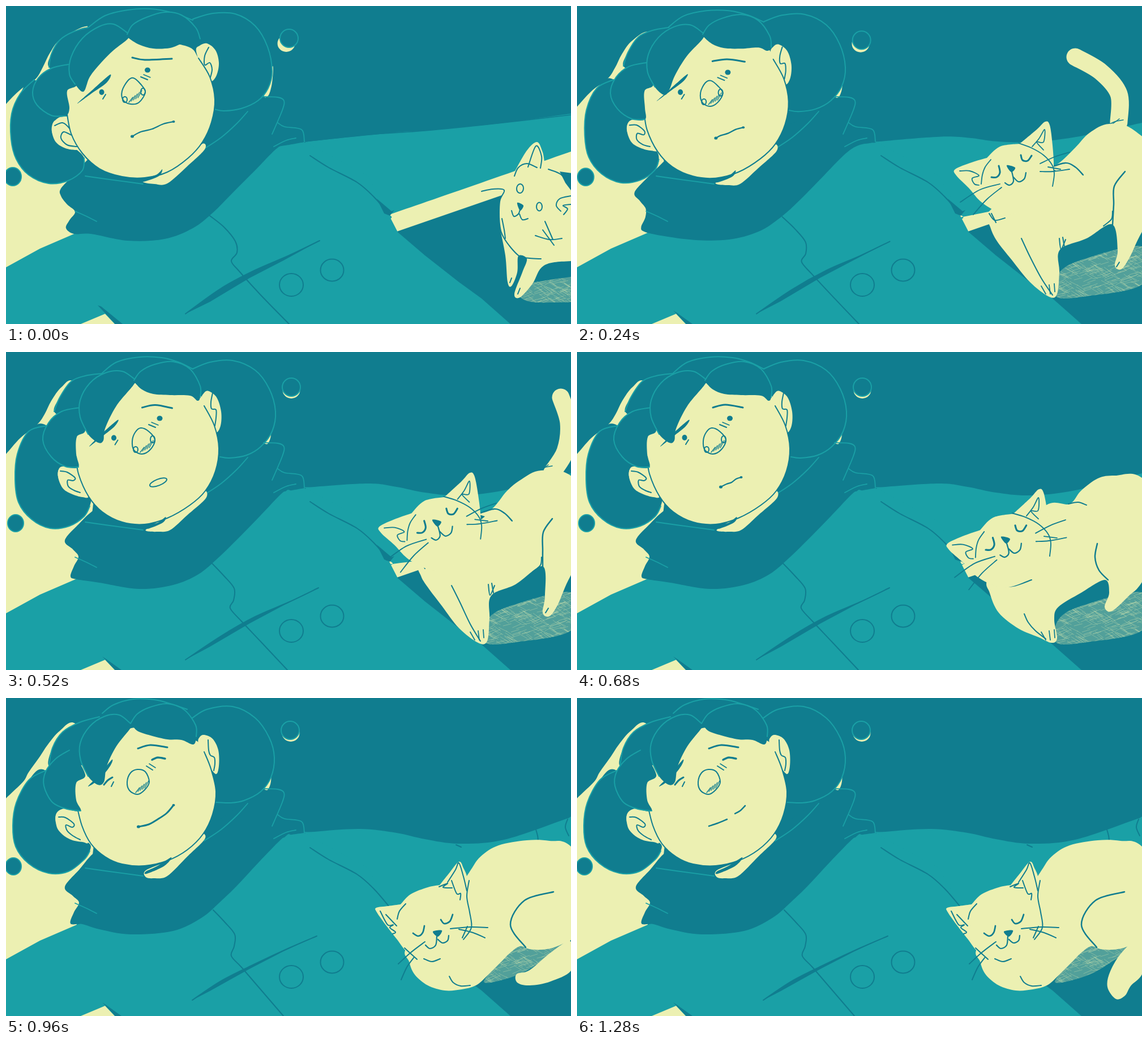
These frames come from a looping animation (998 by 561 pixels, 1.4 s). An HTML page with a canvas:

```html
<!DOCTYPE html>
<html lang="en">
<head>
<meta charset="utf-8">
<title>Cat nap</title>
<style>
html, body { margin: 0; width: 100%; height: 100%; overflow: hidden; background: #107d8f; }
canvas { display: block; width: 100vw; height: 100vh; }
</style>
</head>
<body>
<canvas id="stage" width="998" height="561"></canvas>
<script>
const ctx = document.getElementById('stage').getContext('2d');
const DARK = '#107d8f', TEAL = '#1aa0a6', CREAM = '#ecf0b2';
const LOOP = 1400;
let now = 0;

const parse = s => s.trim().split(/[ ,]+/).map(Number);

// Keyframed number list: {time: "x,y x,y ..."} -> function giving the list at the current time
function keyed(keys) {
  const list = Object.entries(keys).map(([t, s]) => [+t, parse(s)]);
  return () => {
    const i = list.findIndex(k => k[0] > now);
    if (i < 0) return list[list.length - 1][1];
    if (i === 0) return list[0][1];
    const [ta, a] = list[i - 1], [tb, b] = list[i];
    const k = (now - ta) / (tb - ta);
    return a.map((v, j) => v + (b[j] - v) * k);
  };
}
// The usual head movement: worried, then looking over, then content
const turn = (a, b, c = b) => keyed({ 0: a, 360: b, 680: b, 960: c });

// Smooth curve through points; a repeated point makes a corner
function trace(p, closed) {
  const n = p.length / 2;
  const at = i => {
    i = closed ? (i + n) % n : Math.max(0, Math.min(n - 1, i));
    return [p[2 * i], p[2 * i + 1]];
  };
  ctx.beginPath();
  ctx.moveTo(p[0], p[1]);
  for (let i = 0; i < (closed ? n : n - 1); i++) {
    const [a, b, c, d] = [at(i - 1), at(i), at(i + 1), at(i + 2)];
    ctx.bezierCurveTo(b[0] + (c[0] - a[0]) / 6, b[1] + (c[1] - a[1]) / 6,
      c[0] - (d[0] - b[0]) / 6, c[1] - (d[1] - b[1]) / 6, c[0], c[1]);
  }
}
function fill(p, color) {
  trace(p, true);
  ctx.fillStyle = color;
  ctx.fill();
}
function line(p, color = DARK, width = 2, closed = false) {
  trace(p, closed);
  ctx.strokeStyle = color;
  ctx.lineWidth = width;
  ctx.stroke();
}
function flat(p, color) {
  ctx.beginPath();
  for (let i = 0; i < p.length; i += 2) ctx.lineTo(p[i], p[i + 1]);
  ctx.fillStyle = color;
  ctx.fill();
}
const marks = (s, color, width) => s.split('|').forEach(m => line(parse(m), color, width));
function oval(x, y, rx, ry, color, stroke, turned = 0) {
  ctx.beginPath();
  ctx.ellipse(x, y, rx, ry, turned, 0, 7);
  if (color) { ctx.fillStyle = color; ctx.fill(); }
  if (stroke) { ctx.strokeStyle = stroke; ctx.lineWidth = 2; ctx.stroke(); }
}
function lock(p, outlined) {
  fill(p, DARK);
  line(p.slice(0, outlined * 2), TEAL, 2);
}
function placed(x, y, draw, angle = 0, size = 1, cx = 0, cy = 0) {
  ctx.save();
  ctx.translate(cx + x, cy + y);
  ctx.rotate(angle);
  ctx.scale(size, size);
  ctx.translate(-cx, -cy);
  draw();
  ctx.restore();
}

const halo = turn(
  '0,173 25,148 52,129 65,108 78,82 98,58 150,37 160,100 150,300 110,420 -20,480 -20,200',
  '0,180 25,152 55,128 68,110 80,86 98,62 120,52 160,100 150,300 110,420 -20,480 -20,200',
  '0,177 30,148 40,131 60,103 74,82 95,58 122,45 160,100 150,300 110,420 -20,480 -20,200');
const sleeve = turn(
  '495,246 525,240 640,228 700,222 740,220 800,214 880,206 998,190 1000,190 1000,256 1000,256 680,367 673,367 480,300',
  '495,245 545,238 640,232 690,238 740,248 800,253 880,244 998,214 1000,214 1000,330 1000,330 690,373 673,367 480,300',
  '495,243 545,236 625,231 690,238 740,249 800,257 880,250 990,213 1000,211 1000,330 1000,330 740,440 673,390 480,300');
const scarf = turn(
  '145,270 120,298 97,322 97,335 108,350 122,363 112,378 106,392 120,402 150,402 215,414 280,411 330,392 365,365 400,330 440,290 480,250 500,245 527,240 527,240 524,222 490,200 485,165 450,160 345,230 200,250',
  '156,278 130,302 104,332 118,348 128,361 120,378 114,396 125,401 165,407 235,418 295,411 340,392 375,363 410,329 450,288 490,247 505,244 528,240 528,240 524,222 490,200 490,168 455,160 345,230 200,250',
  '158,271 130,302 104,333 118,349 129,361 120,378 114,398 135,399 165,408 220,417 295,411 345,388 378,360 410,329 450,286 492,244 505,241 527,238 527,238 524,222 490,200 488,168 455,160 345,230 200,250');
const face = turn(
  '108,150 107,185 115,225 135,260 165,287 205,301 245,303 285,293 322,268 347,240 363,205 369,165 360,125 340,92 322,72 260,60 215,55 165,95',
  '124,150 124,185 128,215 146,255 170,282 205,300 245,304 285,293 325,270 352,245 370,210 376,170 368,130 350,95 340,75 290,70 228,55 190,90',
  '122,150 124,185 134,225 150,257 175,280 205,293 245,296 285,287 320,268 348,240 365,205 371,165 362,125 350,95 335,75 290,70 222,53 185,90');
const neck = turn(
  '245,305 280,293 322,265 347,243 351,253 320,283 285,313 262,314 243,311',
  '250,311 280,293 325,270 350,245 353,258 320,288 290,314 268,317 249,316',
  '247,304 285,288 322,266 345,240 351,249 320,280 285,314 262,318 247,316');
const chin = turn('238,306 265,298 276,288 270,300 243,310', '245,307 268,301 282,291 277,301 250,312', '247,306 268,296 292,281 280,296 249,310');
const earRight = turn(
  '336,80 342,70 355,66 370,78 376,100 372,122 362,133 350,120',
  '345,85 350,72 358,69 372,80 380,105 379,130 370,141 356,110',
  '340,80 342,69 350,65 365,72 375,92 376,120 370,134 353,110');
const earRightFold = turn('358,73 351,88 351,104 360,100 364,112 361,126', '365,72 362,88 363,100 371,102 371,116 369,130', '357,74 358,92 361,101 368,105 369,116 367,128');
const earLeft = turn(
  '118,202 100,195 86,203 81,220 88,240 105,251 125,254 132,250',
  '132,205 110,202 95,204 92,220 100,240 115,250 135,256 146,252',
  '128,202 105,195 90,202 88,218 97,238 115,250 135,254 145,252');
const earLeftFold = turn('86,211 100,206 113,217 117,228 102,222 97,233 108,245 125,248', '96,210 108,212 122,222 118,227 109,226 110,237 120,244 131,248', '93,210 105,211 120,222 117,228 106,224 108,234 118,243 131,250');

const sliver = turn('471,106 470,135 464,157 456,160 458,140', '468,138 467,152 462,162 456,160 460,150');
const hairRight = turn(
  '330,23 365,13 405,14 440,35 462,72 470,115 463,145 445,167 415,181 385,185 368,182 345,60',
  '325,32 360,18 400,15 440,32 465,65 476,105 470,140 450,167 425,182 395,187 378,185 345,70',
  '328,36 355,20 400,15 440,35 465,70 474,105 468,140 450,165 420,181 395,185 370,184 340,70');
const hairBack = turn(
  '76,108 80,85 95,60 120,45 150,37 205,45 150,110 110,120',
  '85,105 95,80 115,52 140,42 170,38 215,45 150,110 110,115',
  '76,120 82,88 100,60 130,43 165,33 210,40 150,110 110,120');
const hairTop = turn(
  '145,38 175,17 215,7 255,5 295,12 330,25 300,50 210,50',
  '170,37 195,18 235,9 275,10 305,18 330,30 300,50 220,45',
  '170,27 190,12 225,2 262,3 290,10 320,20 300,50 220,40');
const hairLow = turn(
  '50,130 25,155 10,190 9,235 18,270 40,298 75,313 110,308 135,290 138,268 120,250 100,240 82,225 85,203 110,193',
  '72,130 40,140 20,180 16,225 22,265 45,295 78,311 112,307 138,290 148,272 146,255 105,240 92,220 97,203 125,200',
  '70,128 40,145 18,185 12,225 17,262 40,292 75,309 110,306 138,285 148,270 145,255 100,240 88,220 93,200 128,198');
const hairSide = turn(
  '110,103 80,110 57,127 47,152 55,175 80,193 105,194 112,180 108,150 125,138',
  '130,98 98,105 75,125 65,155 80,185 105,202 128,203 124,180 125,150 140,138',
  '112,92 88,107 70,130 67,155 82,184 108,196 132,199 124,180 124,150 140,135');
const fringeRight = turn(
  '214,50 224,33 248,20 280,11 310,16 335,38 343,58 330,65 312,66 290,74 260,75 235,68 216,56',
  '226,50 238,34 262,22 295,17 325,30 343,60 343,80 338,86 325,77 290,76 260,74 240,66 226,52',
  '220,45 232,28 255,16 285,10 315,21 335,48 336,68 331,82 310,74 285,73 255,66 232,58 222,46');
const fringeLeft = turn(
  '214,47 190,32 165,36 135,57 115,90 112,120 122,138 137,151 148,125 168,100 190,78 216,57',
  '226,47 205,34 175,37 148,55 131,85 131,115 145,145 163,160 172,156 175,135 195,95 226,57',
  '220,45 200,30 175,32 148,50 131,80 132,110 145,138 162,153 173,148 178,120 195,85 220,53');

const browLeft = keyed({ 0: '126,172 155,146 184,121 178,135 150,155', 160: '136,169 165,145 193,121 186,133 160,152', 360: '147,167 165,148 197,120 192,131 170,149', 680: '147,167 165,148 197,120 192,131 170,149', 960: '145,156 165,135 187,109 184,120 165,143' });
const browRight = keyed({ 0: '223,91 245,95 293,93', 160: '238,97 265,94 298,97', 360: '241,98 265,94 294,100', 680: '240,98 262,93 293,98', 960: '233,89 255,83 285,87' });
const eyes = keyed({ 0: '169,152 250,113', 160: '177,152 262,117', 360: '191,152 273,117', 680: '190,151 270,117', 960: '184,147 268,107' });
const bags = keyed({ 0: '238,125 250,130', 160: '246,125 258,130', 360: '252,128 264,133', 680: '252,128 264,133', 960: '248,120 259,127' });
const nose = keyed({
  0: '215,132 225,127 238,138 246,152 235,170 220,173 207,166 205,150',
  160: '225,132 235,130 247,142 254,153 245,168 232,175 218,168 215,150',
  360: '228,142 238,134 252,140 263,155 255,172 240,180 226,173 223,157',
  680: '228,142 238,134 252,140 263,155 255,172 240,180 226,173 223,157',
  960: '220,132 232,126 246,130 253,148 245,162 232,170 218,163 214,148' });
const mouth = keyed({ 0: '223,230 238,222 258,217 278,208 296,204', 160: '240,231 248,226 266,221 282,211 297,211', 280: '248,234 256,230 268,226 280,221 292,216', 600: '254,238 264,233 273,230 281,224 290,221', 680: '254,238 264,233 273,230 281,224 290,221', 960: '234,227 252,223 268,214 284,203 296,189' });

const placket = turn('360,370 385,390 405,415 408,435 398,450 412,468 450,510 500,561', '364,373 385,395 403,417 402,438 396,452 416,475 450,511 497,561', '366,374 386,395 404,417 403,438 398,455 416,475 447,511 490,561');
const pocket = turn('317,543 380,498 440,466 500,440 554,414 490,449 430,480 360,522', '317,543 380,501 440,467 500,441 552,416 490,447 430,479 360,520', '329,533 380,499 440,469 500,441 549,420 490,447 430,478 360,517');
const moon = turn('500,57 495,66', '504,62 504,67', '502,57 503,62');
const dot = turn('12,301 15', '17,302 14', '13,297 14');

function features() {
  fill(browLeft(), DARK);
  line(browRight(), DARK, 3);
  const [lx, ly, rx, ry] = eyes();
  if (now < 840) {
    oval(lx, ly, 4.5, 5, DARK);
    oval(rx, ry, 5, 4.5, DARK);
    line([lx + 2, ly + 12, lx + 7, ly + 4]);
  } else {
    line([lx - 11, ly + 6, lx - 4, ly - 2, lx + 4, ly - 7], DARK, 3);
    line([rx - 10, ry + 2, rx, ry - 2, rx + 13, ry], DARK, 3.5);
    line([lx + 2, ly + 9, lx + 6, ly + 1]);
  }
  const b = bags();
  line(b);
  line(b.map((v, i) => v + (i % 2 ? -4 : 5)), DARK, 1.5);

  const n = nose();
  line(n, DARK, 2, true);
  if (now < 840) {
    oval(n[12] + 3, n[13] - 1, 4, 5, null, DARK);
    oval(n[6] - 4, n[7] - 1, 4, 6, null, DARK);
  }
  for (let i = 0; i < 5; i++) {
    const x = n[10] - 3 + i * 4, y = n[11] - 3 - i * 2;
    line([x, y, x + 7, y - 9 - i], DARK, 1.3);
  }
  if (now >= 320 && now < 640) {
    const squeeze = now < 480 ? 6.5 : 5.5;
    oval(269, 230, 16, squeeze, CREAM, DARK, -.38);
    return;
  }
  const m = mouth();
  if (now >= 1200) {
    line([233, 226, 248, 221, 265, 214], DARK, 2.5);
    line([279, 204, 288, 199, 297, 190], DARK, 2.5);
  } else {
    line(m, DARK, now >= 880 ? 3 : 2.3);
    oval(m[0], m[1], 3, 2.6, DARK);
    oval(m[8], m[9], 2.5, 2, DARK);
  }
}

function person() {
  const [mx, my, cx, cy] = moon();
  oval(cx, cy, 15.5, 15, CREAM);
  oval(mx, my, 16, 16, DARK, TEAL);

  fill(halo(), CREAM);
  const [dx, dy, dr] = dot();
  oval(dx, dy, dr, dr + 1, DARK, TEAL);
  if (now < 800) flat([673, 366, 1000, 252, 1000, 291, 690, 398], CREAM);
  fill(sleeve(), TEAL);
  flat([0, 461, 60, 428, 125, 400, 300, 330, 480, 248, 530, 240, 640, 300, 676, 368, 692, 399, 740, 440, 800, 487, 840, 516, 891, 561, 0, 561], TEAL);
  if (now < 240) line([530, 239, 640, 227, 740, 220, 860, 208, 998, 192], DARK, 1.5);
  if (now >= 880) marks('936,232 939,243 940,252|992,214 988,228 994,243|795,259 804,263', DARK, 2);

  line([537, 264, 570, 285, 620, 311, 650, 337, 676, 367], DARK, 2);
  if (now < 800) flat([655, 340, 681, 362, 686, 360, 678, 370, 668, 366], DARK);
  line(placket(), DARK, 2);
  const p = pocket();
  flat(p, DARK);
  line(p.slice(0, 10), DARK, 2);
  oval(504, 492, 21, 20, null, DARK);
  oval(576, 466, 20.5, 19.5, null, DARK);
  flat([132, 561, 175, 543, 192, 561], CREAM);
  flat(now < 240 ? [162, 528, 168, 530, 206, 561, 193, 561] : [170, 537, 176, 541, 204, 561, 193, 561], DARK);

  fill(scarf(), DARK);
  fill(sliver(), CREAM);
  lock(hairRight(), 11);
  marks('427,186 408,207 380,232 350,252|455,160 480,161 491,167 488,184 470,226|480,206 492,213 522,218 527,239|473,248 495,237 512,233', TEAL, 1.8);
  lock(hairBack(), 5);
  lock(hairTop(), 6);
  lock(hairLow(), 10);
  marks('140,300 175,305 242,314|122,362 140,370 160,380', TEAL, 1.8);
  for (const [ear, fold] of [[earRight(), earRightFold()], [earLeft(), earLeftFold()]]) {
    fill(ear, CREAM);
    line(fold, DARK, 2);
  }
  fill(neck(), CREAM);
  const f = face();
  fill(f, CREAM);
  line(f.slice(2, 28), DARK, 2);
  fill(chin(), DARK);
  lock(hairSide(), 7);
  lock(fringeLeft(), 7);
  lock(fringeRight(), 7);
  features();
}

const shade = {
  sit: '905,505 930,488 1100,470 1100,512 940,523',
  prowl: '864,510 880,480 930,466 1100,455 1100,530 930,535 880,528',
  stand: '846,512 852,470 900,445 1000,425 1000,490 900,512',
  rest: '845,502 870,470 908,438 980,437 945,465 900,490'
};
function shadow(points) {
  let seed = 7;
  const rnd = () => (seed = seed * 16807 % 2147483647) / 2147483647;
  ctx.save();
  trace(parse(points), true);
  ctx.clip();
  ctx.fillStyle = 'rgba(236,240,178,.3)';
  ctx.fillRect(800, 400, 200, 161);
  ctx.strokeStyle = 'rgba(236,240,178,.3)';
  ctx.lineWidth = 1;
  ctx.beginPath();
  for (let i = 0; i < 420; i++) {
    const x = 840 + rnd() * 165, y = 425 + rnd() * 115, slope = rnd() < .5 ? 7 : -7;
    ctx.moveTo(x, y);
    ctx.lineTo(x + 14, y + slope + rnd() * 4);
  }
  ctx.stroke();
  ctx.restore();
}

function sittingCat() {
  shadow(shade.sit);
  fill(parse('840,327 865,310 898,293 898,293 920,255 938,240 948,258 956,287 985,292 1100,290 1100,450 998,450 950,458 930,490 908,514 898,508 912,470 920,446 905,441 903,470 893,494 886,487 882,440 872,385 872,345 880,330 880,326'), CREAM);
  flat([978, 292, 1000, 295, 1000, 328, 988, 312], DARK);
  marks('898,300 905,285 920,278 938,285|922,284 936,247 946,265 944,286|840,327 860,323 880,325 872,345 872,385 880,410 905,440 925,445 945,446|958,288 980,297 994,315|998,335 978,340 972,352 980,362|985,368 992,358 984,352 998,350|952,380 966,412|935,405 960,412 982,410|948,395 968,422|882,410 880,395 876,375|890,488 893,480|904,508 908,498', DARK, 2);
  oval(908, 322, 6, 8, null, DARK, .1);
  oval(942, 354, 5, 7.5, null, DARK);
  fill(parse('903,347 914,352 908,361'), DARK);
  marks('893,361 897,371 905,367 908,359|907,367 912,377 922,375', DARK, 2);
}

function prowlingCat() {
  shadow(shade.prowl);
  fill(parse('893,448 886,485 893,495 903,480 903,450'), CREAM);
  fill(parse('762,345 795,330 804,320 804,320 812,285 828,262 844,280 874,303 874,303 910,294 950,278 998,259 1100,230 1100,430 998,428 940,440 905,456 872,482 848,510 830,515 819,503 826,488 848,460 853,430 830,425 810,410 796,385 794,362 775,361'), CREAM);
  line([762, 345, 775, 361, 795, 362], DARK, 2);
  marks('806,318 822,309 845,309 875,317 900,327 912,334|813,302 826,270 836,290 843,306|898,374 899,348 916,333 940,338 964,346 940,368 910,380|794,362 798,390 812,411 832,425 855,429|904,370 920,360 944,356 925,372|880,306 905,302 932,303|885,310 905,309 928,313|892,315 918,319|862,404 890,416 920,419|866,395 892,407 924,406|855,432 872,425 905,433|822,500 826,489 838,488 846,494|832,512 835,501|895,460 901,468 898,485|975,326 996,319', DARK, 2);
  marks('806,354 810,361 818,360|848,376 852,383 862,382', DARK, 3.5);
  fill(parse('818,378 831,382 823,390'), DARK);
  marks('809,386 810,395 819,395 823,388 829,402 840,403 846,398', DARK, 2.3);
}

const tail = keyed({ 240: '880,90 925,116 957,155 957,205', 360: '892,74 930,108 958,152 958,205', 520: '980,80 994,125 988,175 965,212', 680: '1080,110 1080,160 1060,200 1020,240' });
const body = keyed({
  360: '726,365 730,390 742,415 768,448 800,487 834,513 848,508 852,470 853,430 900,410 945,385 955,430 950,458 962,464 978,440 1000,395 1060,300 985,220 940,208 905,224 880,250 850,278 820,290 770,330',
  520: '730,372 733,395 745,415 770,448 800,487 834,513 850,510 854,470 857,430 900,410 948,378 952,430 948,460 960,466 975,445 1000,390 1060,300 1000,220 945,209 910,225 885,245 858,277 825,290 770,330',
  680: '726,398 729,425 745,460 780,488 815,503 838,513 848,505 843,472 850,450 890,425 932,402 940,425 932,450 945,457 975,430 1000,403 1060,300 998,222 950,218 920,223 890,245 870,268 829,270 770,330',
  960: '708,440 712,465 722,488 745,507 775,516 805,514 830,507 850,490 875,465 890,450 908,438 925,443 945,444 965,441 985,433 1000,424 1060,340 998,262 960,252 920,251 870,260 838,280 818,308 770,380' });
const legs = keyed({
  360: '785,410 800,442 820,480 840,510 968,292 949,318 948,350 946,386',
  520: '787,412 802,442 820,480 838,510 965,294 949,318 948,350 948,380',
  680: '790,462 797,477 810,492 828,506 919,338 915,362 922,385 938,402',
  960: '783,491 790,502 803,508 820,507 967,342 916,357 891,400 918,440' });
const headMove = keyed({ 240: '12,-4 0 1', 360: '0,0 0 1', 520: '7,11 -.05 1.03', 680: '3,41 -.05 1.04', 960: '7,123 0 .92' });
const settle = keyed({ 680: '-6,-85', 960: '0,0' });
const restTail = keyed({ 1160: '998,430 965,447 925,480 902,487 903,502 925,507 962,500 1000,478', 1240: '998,422 964,447 942,482 937,510 952,531 968,525 978,508 1000,482' });

function alertHead() {
  fill(parse('726,365 700,348 680,325 658,303 656,292 685,280 712,272 712,272 735,252 770,247 770,247 800,222 815,208 823,214 828,250 830,290 825,330 790,360 750,372'), CREAM);
  marks('702,318 704,302 709,288 719,275|768,246 790,254 812,267 827,284 831,300 828,322|664,295 682,295 698,303 686,308 690,318 698,320|792,252 804,238 814,222 812,244 800,244 812,258|735,318 700,328 665,350|738,324 712,345 688,372|806,282 832,270 858,262|806,296 828,296 858,292|820,288 842,292', DARK, 1.8);
  marks('720,306 729,306 735,298 733,286|772,267 775,276 784,277 791,268', DARK, 3);
  fill(parse('747,285 762,289 755,297'), DARK);
  marks('744,316 752,320 759,313 756,296|759,306 768,314 778,309 781,298', DARK, 2.2);
}

function sleepyHead() {
  fill(parse('710,450 690,425 672,402 655,378 654,370 675,367 697,364 697,364 715,346 745,334 766,330 766,330 782,310 800,289 808,300 816,325 822,400 800,430 770,460 740,470'), CREAM);
  marks('661,376 674,400 684,400 678,405 688,413 683,416|671,382 690,402|691,390 695,376 706,363|765,333 780,327 772,334 788,335|780,325 794,303 800,291 808,315 814,340|787,322 796,345 803,345 802,356|818,322 814,350 819,378 822,405 808,426|740,430 715,449 693,469|721,457 708,475 698,497|785,407 820,404 851,405|800,408 825,414 846,423|815,403 806,423|738,460 752,465 767,460|704,441 716,452 726,461', DARK, 2);
  marks('719,415 728,420 736,414 739,402|768,391 774,398 784,394 789,382', DARK, 2.7);
  fill(parse('754,412 770,410 763,421'), DARK);
  marks('741,436 749,442 759,436 761,420|763,426 771,432 780,428 782,419', DARK, 2.2);
}

function friendlyCat() {
  const lying = now >= 840;
  shadow(lying ? shade.rest : shade.stand);
  if (now < 680) {
    line(tail(), CREAM, 31);
    marks('940,209 950,204 965,201|946,208 958,199', DARK, 1.5);
  }
  if (now >= 880) fill(restTail(), CREAM);
  fill(body(), CREAM);
  const l = legs();
  line(l.slice(0, 8), DARK, 2);
  line(l.slice(8), DARK, 2.5);
  if (!lying) {
    marks('820,494 828,508|834,492 836,508|843,490 844,504', DARK, 1.8);
    if (now < 640) {
      marks('852,410 855,429 863,412|858,408 861,425|930,388 944,376 946,362|953,460 958,452|728,366 738,378 756,374|732,366 740,382', DARK, 2);
      marks('830,287 862,277 880,284 894,298|832,290 836,305 828,318', DARK, 2.3);
      flat([830, 285, 846, 290, 834, 300], DARK);
    } else {
      marks('725,402 745,411 770,413 803,402|755,411 785,408|868,268 885,265 900,270', DARK, 2);
    }
  }
  if (lying) {
    const [x, y] = settle();
    placed(x, y, sleepyHead);
  } else {
    const [x, y, angle, size] = headMove();
    placed(x, y, alertHead, angle, size, 755, 300);
  }
}

function render() {
  const t = performance.now() % LOOP;
  const step = t < 240 ? 80 : 40;
  now = Math.min(1280, Math.floor(t / step) * step);
  ctx.fillStyle = DARK;
  ctx.fillRect(0, 0, 998, 561);
  ctx.lineCap = ctx.lineJoin = 'round';
  person();
  if (now < 160) placed(now ? -40 : 0, 0, sittingCat);
  else if (now < 240) prowlingCat();
  else friendlyCat();
  requestAnimationFrame(render);
}
render();
</script>
</body>
</html>
```
